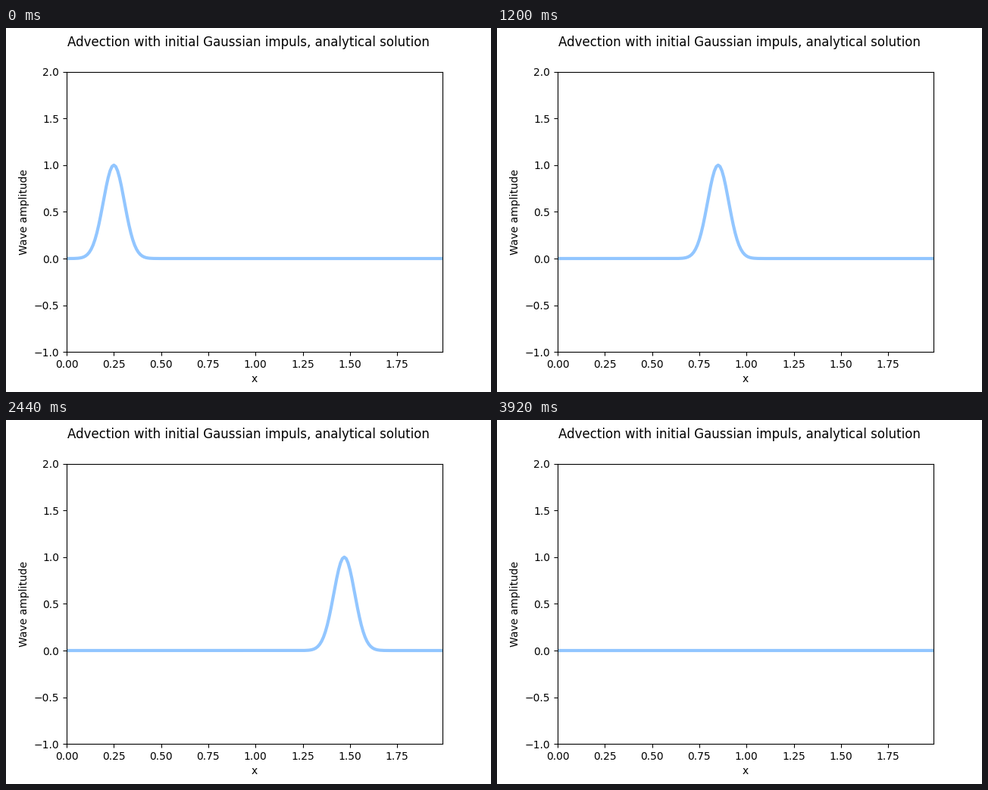
A matplotlib script that plays this animation: 640 px wide and 480 px high, repeating every 6000 ms.

```python
import numpy as np
import matplotlib.pyplot as plt
from matplotlib.animation import FuncAnimation

FRAMES = 300
INTERVAL = 20        # ms
LAST_MOVE = 196      # the pulse has left the domain by then
START = 0.25
STEP = 0.01          # distance travelled per frame
WIDTH = 0.00625      # squared length scale of the Gaussian

plt.rcParams["font.family"] = "DejaVu Sans"

x = np.arange(200) * 0.01


def pulse(frame):
    centre = START + STEP * min(frame, LAST_MOVE)
    return np.exp(-(x - centre) ** 2 / WIDTH)


fig, ax = plt.subplots(figsize=(6.4, 4.8), dpi=100)
fig.suptitle("Advection with initial Gaussian impuls, analytical solution")
line, = ax.plot(x, pulse(0), color="#92C6FF", lw=3)
ax.set(xlim=(x[0], x[-1]), ylim=(-1, 2), xlabel="x", ylabel="Wave amplitude")


def update(frame):
    line.set_ydata(pulse(frame))
    return line,


anim = FuncAnimation(fig, update, frames=FRAMES, interval=INTERVAL,
                     init_func=lambda: update(0), repeat=True, repeat_delay=0)
plt.show()
```
